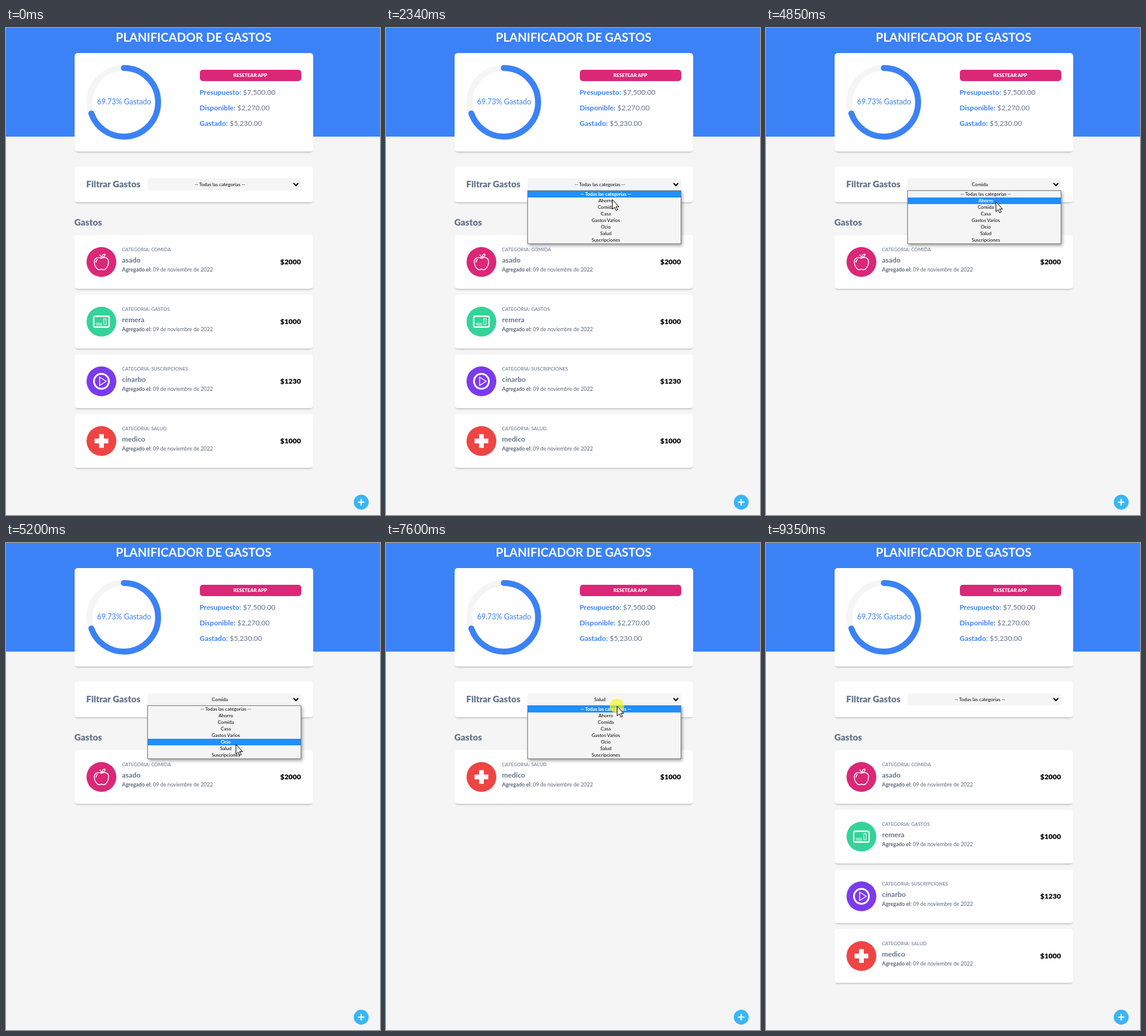
An HTML page for the animation above (9.41 s loop, 627 px wide and 816 px high).

```html
<!DOCTYPE html>
<html lang="es">
<head>
<meta charset="utf-8">
<title>Planificador de gastos</title>
<style>
  html, body { margin: 0; width: 100%; height: 100%; overflow: hidden; background: #f5f5f5; }
  body { position: relative; font-family: Lato, sans-serif; }
  header { position: absolute; width: 100%; height: 182px; background: #3b82f6; }
  .card { position: absolute; left: 115px; width: 400px; background: #fff; border-radius: 5px;
    box-shadow: 0 3px 3px -2px rgb(0 0 0 / .25), 0 3px 4px -2px rgb(0 0 0 / .06); }
  svg { position: absolute; left: 0; top: 0; overflow: visible; }
  text { font-size: 12px; fill: #64748b; white-space: pre; }
  .small { font-size: 8px; }
  .large { font-size: 15px; }
  .b { font-weight: 700; }
  .k { font-weight: 900; }
  .mid { text-anchor: middle; }
  .blue { fill: #3b82f6; }
  .line { fill: none; stroke: #fff; stroke-width: 1.4; }
  #menu { position: absolute; left: 237px; top: 272px; width: 256px; height: 88px;
    border: 1px solid #767676; background: #f5f5f5; box-shadow: 2px 3px 5px rgb(0 0 0 / .35); }
  #menu div { height: 11px; padding-left: 5px; font-size: 8px; line-height: 11px; text-align: center; color: #000; }
  #menu .on { background: #1e90ff; color: #fff; -webkit-text-stroke: .25px #fff; }
</style>
</head>
<body>
<header></header>
<div class="card" style="top:42px;height:165px"></div>
<div class="card" style="top:232px;height:60px"></div>
<svg width="627" height="816">
  <text class="b mid" x="314.5" y="23" style="font-size:20px;fill:#fff">PLANIFICADOR DE GASTOS</text>
  <g fill="none" stroke-width="10" stroke-linecap="round" transform="translate(197.5 124.5) rotate(-90)">
    <circle r="57.5" stroke="#f5f5f5"/>
    <circle r="57.5" stroke="#3b82f6" pathLength="100" stroke-dasharray="69.73 100"/>
  </g>
  <text class="blue mid" x="198" y="128" style="font-size:12.5px">69.73% Gastado</text>
  <rect x="325" y="70" width="170" height="19" rx="5" fill="#db2777"/>
  <text class="k mid small" x="409.5" y="82" style="fill:#fff">RESETEAR APP</text>
  <g id="budget"></g>
  <text class="k large" x="134.5" y="267">Filtrar Gastos</text>
  <rect id="field" x="237" y="252" width="258" height="20" rx="4" fill="#f5f5f5" stroke-width="2"/>
  <text id="value" class="mid small" x="358.5" y="265" style="fill:#000"></text>
  <path d="M482 260l4 4 4-4" fill="none" stroke="#000" stroke-width="2"/>
  <text class="k large" x="114.5" y="331">Gastos</text>
  <circle cx="595.5" cy="794.5" r="12.5" fill="#38b6f8"/>
  <path d="M590 794.5h11M595.5 789v11" class="line" style="stroke-width:2.2"/>
</svg>
<div id="list"></div>
<div id="menu"></div>
<svg width="627" height="816">
  <g id="pointer">
    <circle id="press" r="12" fill="#f6f61e" opacity=".68"/>
    <path d="M.5 .5v16l4-3 2 5 3-1-3-5h5z" fill="#fff" stroke="#000"/>
  </g>
</svg>
<script>
const LOOP = 9410, REACTION = 70, PRESS = 130, HOVER_LAG = 30;
const MENU_TOP = 273, ROW = 11;
const $ = id => document.getElementById(id);

const options = ['-- Todas las categorias --', 'Ahorro', 'Comida', 'Casa', 'Gastos Varios', 'Ocio', 'Salud', 'Suscripciones'];
const budget = { Presupuesto: '$7,500.00', Disponible: '$2,270.00', Gastado: '$5,230.00' };

const appleHalf = side => `<path transform="scale(${side} 1)" d="M0-6C6-9 12-7 12 0S7 13 4 13Q2 13 0 12"/>`;
const icons = {
  apple: appleHalf(1) + appleHalf(-1) + '<path d="M0-6Q0-10-3-12M1-8Q1-13 6-13Q6-8 1-8M-9 1Q-9-4-6-4"/>',
  card: '<rect x="-13" y="-9" width="26" height="18" rx="2.5" stroke-width="2.3"/><path stroke-width="1" d="M-10 3H1M-9 5.5H1M4-5h4V5h-4z"/>',
  play: '<circle r="12.5" stroke-width="3"/><path d="M-3-7L8 0L-3 7z"/>',
  cross: '<path stroke-width="8" d="M-11.5 0h23M0-11.5v23"/>'
};

const expenses = [
  { option: 'Comida', name: 'asado', amount: 2000, color: '#db2777', icon: 'apple' },
  { option: 'Gastos Varios', name: 'remera', amount: 1000, color: '#34d399', icon: 'card' },
  { option: 'Suscripciones', name: 'cinarbo', amount: 1230, color: '#7c3aed', icon: 'play' },
  { option: 'Salud', name: 'medico', amount: 1000, color: '#ef4444', icon: 'cross' }
];

// Pointer moves; clicks alternate between opening the menu and picking a row
const entry = { x: 615, y: 758 };
const moves = [
  { from: 390, to: 1080, x: 373, y: 231 },
  { from: 1080, to: 1220, x: 379, y: 264, click: 1400 },
  { from: 2140, to: 2620, x: 379, y: 301, click: 3080 },
  { from: 3830, to: 4170, x: 385, y: 258, click: 4170 },
  { from: 4680, to: 5340, x: 385, y: 342, click: 5530 },
  { from: 5980, to: 6470, x: 384, y: 264, click: 6670 },
  { from: 7140, to: 7270, x: 387, y: 273, click: 7600 },
  { from: 7800, to: 8750, x: 589, y: 816 }
];
const clicks = moves.filter(m => m.click);

const easeOut = k => Math.sin(Math.min(1, Math.max(0, k)) * Math.PI / 2);
const rowAt = y => Math.floor((y - MENU_TOP) / ROW);

function tipAt(t) {
  let { x, y } = entry;
  for (const m of moves) {
    const k = easeOut((t - m.from) / (m.to - m.from));
    x += (m.x - x) * k;
    y += (m.y - y) * k;
  }
  return { x, y };
}

function expenseCard(e, row) {
  const category = e.option.split(' ')[0].toUpperCase();
  return `<div class="card" style="top:${347 + row * 100}px;height:90px"><svg width="400" height="90">
    <g transform="translate(45 45)"><circle r="25" fill="${e.color}"/><g class="line">${icons[e.icon]}</g></g>
    <text class="b small" x="79.5" y="27" style="fill:#8492a8">CATEGORIA: ${category}</text>
    <text class="b" x="79.5" y="46">${e.name}</text>
    <text x="79.5" y="61" style="font-size:8.9px;fill:#5c6878"><tspan class="b">Agregado el:</tspan> 09 de noviembre de 2022</text>
    <text class="k" x="379.5" y="49" text-anchor="end" style="fill:#000">$${e.amount}</text>
  </svg></div>`;
}

let shown = -1;
function showChoice(choice) {
  if (choice === shown) return;
  shown = choice;
  $('value').textContent = options[choice];
  $('list').innerHTML = expenses.filter(e => !choice || e.option === options[choice]).map(expenseCard).join('');
}

$('budget').innerHTML = Object.entries(budget).map(([label, sum], i) =>
  `<text x="324.5" y="${112 + i * 26}"><tspan class="b blue">${label}:</tspan> ${sum}</text>`).join('');
$('menu').innerHTML = options.map(o => `<div>${o}</div>`).join('');
const rows = [...$('menu').children];

function draw(t) {
  const done = clicks.filter(c => t >= c.click + REACTION);
  const open = done.length % 2 === 1;
  const picks = done.filter((c, i) => i % 2);
  const choice = picks.length ? rowAt(picks.at(-1).y) : 0;
  showChoice(choice);

  $('menu').style.display = open ? '' : 'none';
  $('field').setAttribute('stroke', done.length && !open && t < 9350 ? '#101010' : 'none');
  const hover = rowAt(tipAt(t - HOVER_LAG).y);
  rows.forEach((row, i) => row.className = i === (hover < 0 ? choice : hover) ? 'on' : '');

  const { x, y } = tipAt(t);
  $('pointer').style.display = t >= 390 && t < 8750 ? '' : 'none';
  $('pointer').setAttribute('transform', `translate(${Math.round(x)} ${Math.round(y)})`);
  $('press').style.display = clicks.some(c => t >= c.click && t < c.click + PRESS) ? '' : 'none';
}

const start = performance.now();
(function tick() {
  draw((performance.now() - start) % LOOP);
  requestAnimationFrame(tick);
})();
</script>
</body>
</html>
```
